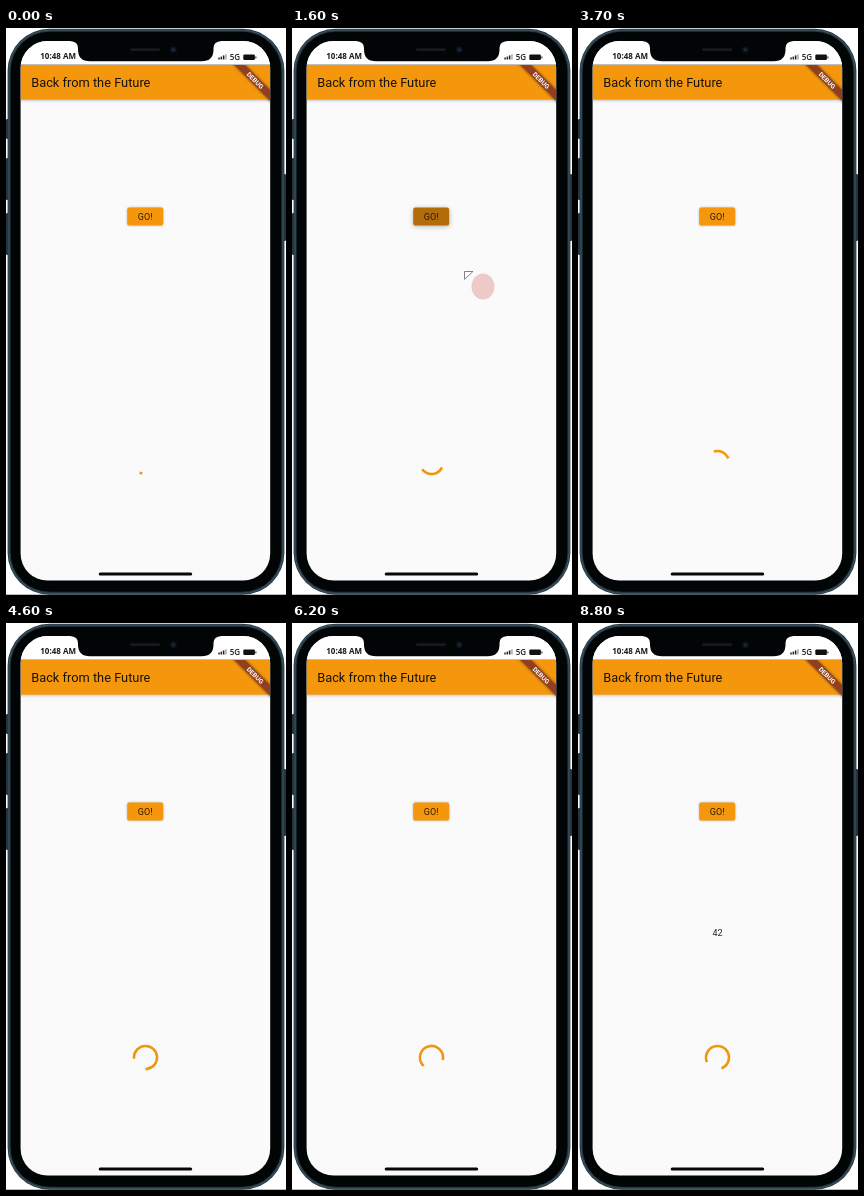
An HTML page that plays this animation: 280 by 567 pixels, repeating every 8.9 s.

```html
<!DOCTYPE html>
<html lang="en">
<head>
<meta charset="utf-8">
<title>Back from the Future</title>
<style>
  html, body { margin: 0; width: 100%; height: 100%; overflow: hidden; background: #fff; }
  svg { display: block; width: 100%; height: 100%; }
  text { font-family: Roboto, sans-serif; }
  .status { font-family: "Open Sans", "Noto Sans", sans-serif; font-weight: 700; font-size: 8px; fill: #1a1a1a; }
  .label { font-size: 9px; fill: #222; text-anchor: middle; }
  .bar { filter: drop-shadow(0 1px 1.8px rgba(0, 0, 0, .22)); }
</style>
</head>
<body>
<svg viewBox="0 0 280 567" preserveAspectRatio="none">
  <defs>
    <clipPath id="screen"><rect x="14.6" y="13" width="249.6" height="539.6" rx="27"/></clipPath>
    <clipPath id="app"><rect x="14.6" y="37" width="249.6" height="516"/></clipPath>
  </defs>

  <!-- phone body -->
  <rect y="566" width="280" height="1" fill="#b9bcbe"/>
  <g fill="#22333d">
    <rect y="91" width="3" height="20" rx="1"/>
    <rect y="130" width="3" height="42" rx="1"/>
    <rect y="185" width="3" height="42" rx="1"/>
    <rect x="277" y="146" width="3" height="67" rx="1"/>
  </g>
  <rect x="1.6" y=".8" width="276.8" height="566" rx="42" fill="#243741"/>
  <rect x="3" y="2.2" width="274" height="563.2" rx="40.5" fill="none" stroke="#3d5563"/>
  <rect x="4.6" y="3.8" width="270.8" height="560" rx="39" fill="#020506"/>

  <!-- screen -->
  <g clip-path="url(#screen)">
    <rect x="14" y="13" width="251" height="540" fill="#fafafa"/>
    <rect x="14" y="13" width="251" height="24" fill="#fff"/>
    <g clip-path="url(#app)">
      <rect class="bar" x="14" y="37" width="251" height="34.7" fill="#f5970d"/>
      <text x="25.2" y="59.2" font-size="12.82" fill="#1a1206">Back from the Future</text>
      <g transform="translate(264.5 37) rotate(45)">
        <rect x="-40" y="17.9" width="80" height="7.7" fill="#913f1e" style="filter:drop-shadow(0 0 1.8px rgba(0,0,0,.5))"/>
        <text y="24.1" font-size="6.5" font-weight="700" fill="#fff" text-anchor="middle">DEBUG</text>
      </g>
    </g>
    <rect x="14" y="36.2" width="251" height=".8" fill="#b5b0ac"/>
    <text class="status" x="34.3" y="30.7">10:48 AM</text>
    <text class="status" x="223.8" y="31.6" style="font-weight:600">5G</text>
    <g fill="#222">
      <rect x="212.3" y="29.5" width="1.5" height="2"/>
      <rect x="214.6" y="28.6" width="1.5" height="2.9"/>
      <rect x="216.9" y="27.4" width="1.5" height="4.1"/>
      <rect x="219.2" y="26.2" width="1.5" height="5.3" fill="#aaa"/>
      <rect x="237.3" y="26.6" width="11.6" height="5.4" rx="1.2" fill="#111"/>
      <rect x="249.4" y="28.2" width="1" height="2.2" rx=".5"/>
    </g>

    <g id="lift"><rect id="button" x="121.2" y="179.6" width="36" height="18" rx="2.2"/></g>
    <text class="label" x="139.2" y="191.6" style="fill:#2a1a06">GO!</text>
    <text id="answer" class="label" x="139.5" y="313.4">42</text>
    <path id="arc" fill="none" stroke="#f0960f" stroke-width="2.56" stroke-linecap="square"/>
    <rect x="92.7" y="544.4" width="93.5" height="3" rx="1.5" fill="#080808"/>
  </g>

  <!-- notch -->
  <path d="M64 12V13Q72 13.5 72 20V21.5Q72 33.3 84 33.3H195.5Q207.5 33.3 207.5 21.5V20Q207.5 13.5 215.5 13V12Z" fill="#020506"/>
  <rect x="124" y="20.3" width="30" height="2.8" rx="1.4" fill="#161a1d"/>
  <circle cx="167.3" cy="21.8" r="3.3" fill="#0d141d"/>
  <circle cx="167.3" cy="21.8" r="1.4" fill="#1c2d48"/>

  <g id="pointer">
    <path d="M.5 .5H9L.5 8.3Z" fill="#fff" stroke="#666" stroke-width=".8"/>
    <ellipse cx="19" cy="15.5" rx="11.5" ry="13" fill="#edc9c7"/>
  </g>
</svg>
<script>
const LOOP = 8900, STEP = 100;
const PRESS = 1200, RELEASE = 1600, ANSWER = 6500;
const CENTER = [139.5, 434.5], RADIUS = 11.54;
const PATH_MS = 1333, TURN_MS = 2222;
const PATH_START = 0.955, TURN_START = 208;
const IDLE = [245, 151, 13], PRESSED = [178, 109, 10];

// time, x, y of the pointer tip
const route = [
  [500, 268, 330], [800, 200, 250], [1100, 142, 188], [1400, 142, 188],
  [1600, 172, 243], [2000, 200, 294], [2700, 228, 345], [3000, 282, 372]
];

const $ = id => document.getElementById(id);
const clamp = v => Math.min(1, Math.max(0, v));
const mix = (a, b, k) => a + (b - a) * k;

// cubic-bezier(.4, 0, .2, 1)
function fastOutSlowIn(x) {
  let low = 0, high = 1;
  for (let i = 0; i < 24; i++) {
    const s = (low + high) / 2, r = 1 - s;
    if (1.2 * r * r * s + 0.6 * r * s * s + s ** 3 < x) low = s; else high = s;
  }
  return low * low * (3 - 2 * low);
}

function point(degrees) {
  const a = degrees * Math.PI / 180;
  return `${CENTER[0] + RADIUS * Math.cos(a)} ${CENTER[1] + RADIUS * Math.sin(a)}`;
}

function drawSpinner(t) {
  const phase = (PATH_START + t / PATH_MS) % 1;
  const head = fastOutSlowIn(clamp(phase * 2));
  const tail = fastOutSlowIn(clamp(phase * 2 - 1));
  const start = -90 + tail * 270 + phase * 90 + TURN_START + t / TURN_MS * 360;
  const sweep = Math.max((head - tail) * 270, 0.1);
  $('arc').setAttribute('d',
    `M${point(start)}A${RADIUS} ${RADIUS} 0 ${sweep > 180 ? 1 : 0} 1 ${point(start + sweep)}`);
}

function drawPointer(t) {
  const i = route.findIndex(([time]) => time > t);
  const visible = i > 0;
  $('pointer').style.display = visible ? '' : 'none';
  if (!visible) return;
  const [t0, x0, y0] = route[i - 1], [t1, x1, y1] = route[i];
  const k = (t - t0) / (t1 - t0);
  $('pointer').setAttribute('transform', `translate(${mix(x0, x1, k)} ${mix(y0, y1, k)})`);
}

function drawButton(t) {
  const press = clamp((t - PRESS) / 200) * (1 - clamp((t - RELEASE) / 200));
  const color = IDLE.map((c, i) => Math.round(mix(c, PRESSED[i], press)));
  $('button').setAttribute('fill', `rgb(${color})`);
  $('lift').style.filter =
    `drop-shadow(0 ${mix(0.6, 1.2, press)}px ${mix(1, 2.4, press)}px rgba(0,0,0,.28))`;
}

function frame() {
  const t = Math.floor(performance.now() % LOOP / STEP) * STEP;
  drawSpinner(t);
  drawPointer(t);
  drawButton(t);
  $('answer').style.display = t >= ANSWER ? '' : 'none';
  requestAnimationFrame(frame);
}
frame();
</script>
</body>
</html>
```
